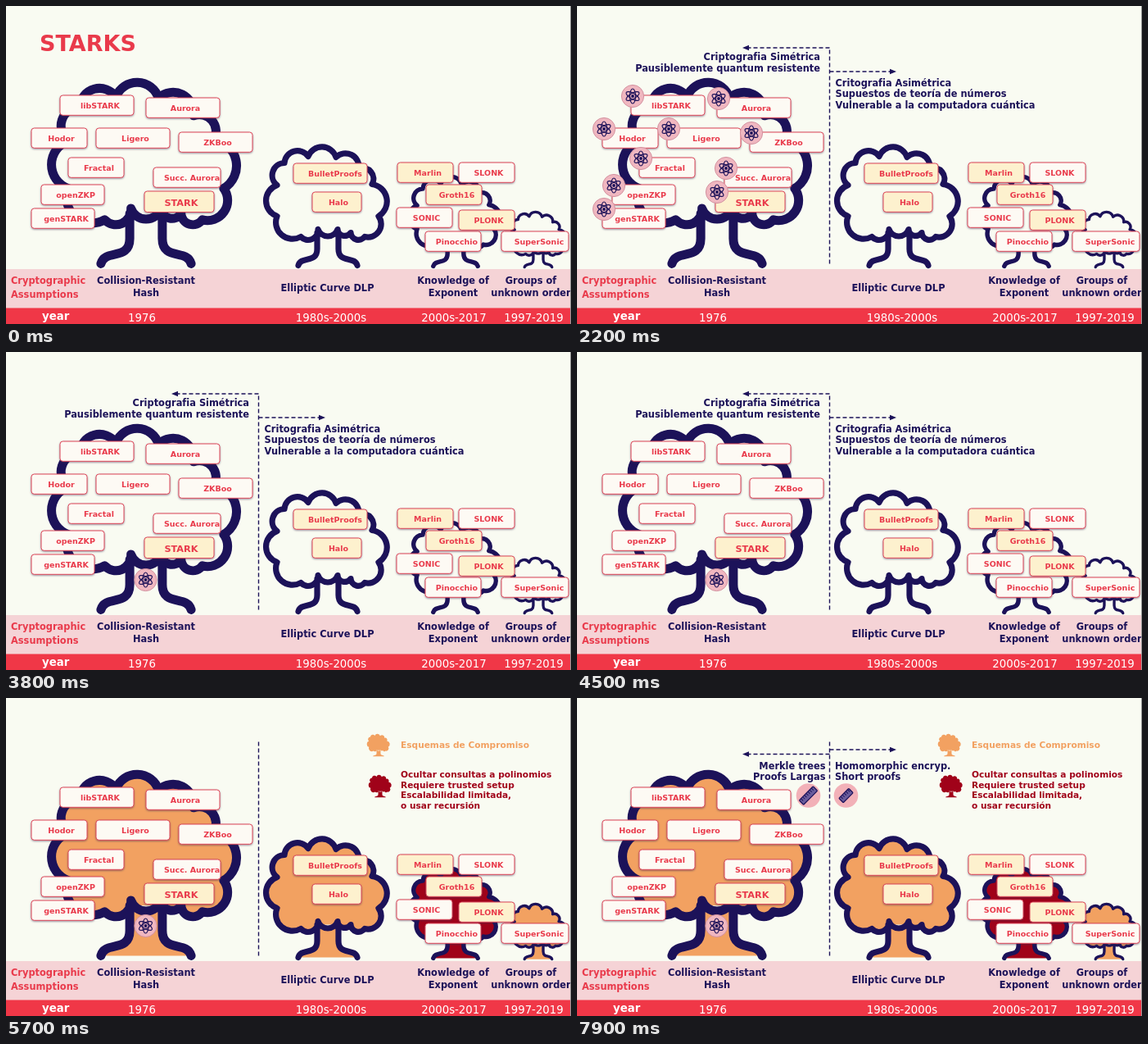
An HTML page for the animation above (8 s loop, 690x388 px).

```html
<!DOCTYPE html>
<html lang="es">
<head>
<meta charset="utf-8">
<title>STARKS</title>
<style>
  html, body { margin: 0; width: 100%; height: 100%; overflow: hidden; background: #f9fbf2; }
  svg { display: block; width: 100vw; height: 100vh; }
  text { font-family: "DejaVu Sans", Verdana, sans-serif; white-space: pre; }
  .card { filter: drop-shadow(.7px 1.5px .8px rgba(70, 45, 80, .55)); }
</style>
</head>
<body>
<svg id="stage" viewBox="0 0 690 388" xmlns="http://www.w3.org/2000/svg"></svg>
<script>
const NAVY = '#1c1259', RED = '#e93a4b', ORANGE = '#f2a161', MAROON = '#a00219';
const LOOP = 8000;
const svg = document.getElementById('stage');

const text = (x, y, s, size, fill, opt = '') =>
  `<text x="${x}" y="${y}" font-size="${size}" fill="${fill}" font-weight="bold" ${opt}>${s}</text>`;
const lines = (x, y, step, list, size, fill, opt) =>
  list.map((s, i) => text(x, y + i * step, s, size, fill, opt)).join('');
const mid = 'text-anchor="middle"', end = 'text-anchor="end"';
const group = (id, body) => `<g id="${id}">${body}</g>`;

// Scalloped outline: one outward arc between each pair of corners.
function cloud(pts) {
  return `M${pts[0]}` + pts.map((p, i) => {
    const q = pts[(i + 1) % pts.length];
    const r = 0.53 * Math.hypot(q[0] - p[0], q[1] - p[1]);
    return `A${r} ${r} 0 0 1 ${q}`;
  }).join('') + 'Z';
}

// One tree shape, standing on the origin; every tree is a scaled copy.
const crown = cloud([[-24,-137], [10,-136], [38,-122], [54,-103], [62,-64], [45,-39], [28,-44],
  [12,-48], [-12,-48], [-33,-39], [-62,-64], [-62,-102], [-53,-129]]);
const leg = s => `M${13 * s} -44V-24C${13 * s} -6 ${33 * s} -16 ${36 * s} -4`;
const trunk = leg(-1) + 'H36C33 -16 13 -6 13 -24V-44Z';

const place = (x, y, k, body) => `<g transform="translate(${x} ${y}) scale(${k})">${body}</g>`;
const solid = fill => `<path d="${crown}${trunk}" fill="${fill}"/>`;
const outline = `<path d="${crown}${leg(-1)}${leg(1)}" fill="none" stroke="${NAVY}" stroke-width="7.2"
  stroke-linecap="round" stroke-linejoin="round"/>`;

const trees = [
  { x: 171, k: 1.53, fill: ORANGE }, { x: 393, k: 1, fill: ORANGE },
  { x: 549, k: 0.756, fill: MAROON }, { x: 650, k: 0.465, fill: ORANGE }
];
const forest = body => trees.map(t => place(t.x, 320.5, t.k, body(t))).join('');

// name, left, top, width
const cards = [
  ['libSTARK', 66, 109, 90], ['Aurora', 171, 112, 90], ['Hodor', 31, 149], ['Ligero', 110, 149, 90],
  ['ZKBoo', 211, 154, 90], ['Fractal', 76, 185], ['Succ. Aurora', 180, 197, 82], ['openZKP', 43, 218, 77],
  ['STARK', 169, 226, 85], ['genSTARK', 31, 247, 77], ['BulletProofs', 351, 192, 90], ['Halo', 374, 227, 60],
  ['Marlin', 478, 191], ['SLONK', 553, 191], ['Groth16', 513, 218], ['SONIC', 477, 246],
  ['PLONK', 553, 249], ['Pinocchio', 512, 275], ['SuperSonic', 605, 275, 82]
];
const highlighted = ['STARK', 'BulletProofs', 'Halo', 'Marlin', 'Groth16', 'PLONK'];

function card([name, x, y, w = 68]) {
  const big = name === 'STARK';
  const fill = highlighted.includes(name) ? '#fdf1ce' : '#fdfaf4';
  return `<rect class="card" x="${x}" y="${y}" width="${w}" height="${big ? 25.5 : 24.3}" rx="3.5"
    fill="${fill}" stroke="#e0485a"/>` +
    text(x + w / 2 + name.length / 2, y + (big ? 17.6 : 15.8), name, big ? 11.3 : 9.5, RED, mid);
}

const atom = (x, y) => place(x, y, 1, `<circle r="13.6" fill="#f0b7c0" stroke="#d3919f"/>
  <g fill="none" stroke="${NAVY}" stroke-width="1.2">${[0, 60, 120].map(a =>
    `<ellipse rx="3.5" ry="9" transform="rotate(${a})"/>`).join('')}</g>
  <circle r="1.9" fill="${NAVY}"/>`);
const quantumSafe = cards.filter(c => c[1] < 300);

const arrow = (x, y) => {
  const s = Math.sign(x - 308.5);
  return `<path d="M308.5 ${y}H${x - 7 * s}" stroke="${NAVY}" stroke-width="1.3" stroke-dasharray="5 3"/>
    <path d="M${x} ${y}l${-8 * s} -3.2v6.4z" fill="${NAVY}"/>`;
};

function ruler(x, len) {
  let ticks = '';
  for (let i = 3 - len / 2; i < len / 2; i += 3) ticks += `M${i} -3.5v3.5`;
  return place(x, 119, 1, `<circle r="14.8" fill="#f2b1b8"/><g transform="rotate(-45)" stroke="${NAVY}">
    <rect x="${-len / 2}" y="-3.8" width="${len}" height="7.6" rx="1" fill="#6a5c9c" stroke-width="1.2"/>
    <path d="${ticks}"/></g>`);
}

const navy = (x, y, s) => text(x, y, s, 11.4, NAVY, mid);
const pair = (x, a, b) => navy(x, 338.5, a) + navy(x, 354, b);
const year = (x, s) => text(x, 385, s, 13.3, '#fff', mid + ' style="font-weight:400"');

const ground = `<rect y="321" width="690" height="48" fill="#f5d3d6"/>
  <rect y="368.5" width="690" height="19.5" fill="#f03747"/>` +
  lines(6, 339, 17, ['Cryptographic', 'Assumptions'], 11.4, RED) +
  pair(171, 'Collision-Resistant', 'Hash') + navy(392.5, 347.5, 'Elliptic Curve DLP') +
  pair(546, 'Knowledge of', 'Exponent') + pair(641, 'Groups of', 'unknown order') +
  text(44, 382.5, 'year', 13.3, '#fff') +
  year(166, '1976') + year(397, '1980s-2000s') + year(547, '2000s-2017') + year(644.5, '1997-2019');

svg.innerHTML =
  '<rect width="690" height="388" fill="#f9fbf2"/>' +
  group('title', text(41, 55.3, 'STARKS', 27, RED)) +
  group('divider', `<path d="M308.5 53.5V317" stroke="${NAVY}" stroke-width="1.4" stroke-dasharray="5 3"/>`) +
  group('fills', forest(t => solid(t.fill))) + forest(() => outline) +
  ground + cards.map(card).join('') +
  group('atoms', quantumSafe.map(([, x, y]) => atom(x + 2, y + 1)).join('')) +
  group('trunkAtom', atom(170.5, 278)) +
  group('kinds', arrow(202, 51) + arrow(390, 80) +
    lines(297, 66, 13.5, ['Criptografia Simétrica', 'Pausiblemente quantum resistente'], 11.4, NAVY, end) +
    lines(315.5, 97.7, 13.6, ['Critografia Asimétrica', 'Supuestos de teoría de números',
      'Vulnerable a la computadora cuántica'], 11.4, NAVY)) +
  group('legend', place(455, 72, 0.19, solid(ORANGE)) + place(457, 122, 0.19, solid(MAROON)) +
    text(482, 60.8, 'Esquemas de Compromiso', 10.6, ORANGE) +
    lines(482, 97, 12.7, ['Ocultar consultas a polinomios', 'Requiere trusted setup',
      'Escalabilidad limitada,', 'o usar recursión'], 10.6, MAROON)) +
  group('proofs', arrow(202, 68.5) + arrow(390, 63) +
    lines(303.5, 86.5, 13.5, ['Merkle trees', 'Proofs Largas'], 11.4, NAVY, end) +
    lines(315, 86.5, 13.5, ['Homomorphic encryp.', 'Short proofs'], 11.4, NAVY) +
    ruler(282.5, 24) + ruler(328.5, 17)) +
  '<rect x="689" width="1" height="388" fill="#999"/>';

// Visible span of each group, in ms.
const spans = {
  title: [0, 1900], divider: [1900, LOOP], atoms: [1900, 3800], kinds: [1900, 5600],
  trunkAtom: [3800, LOOP], fills: [5600, LOOP], legend: [5600, LOOP], proofs: [7800, LOOP]
};
const parts = Object.entries(spans).map(([id, span]) => [document.getElementById(id), span]);

function draw(t) {
  for (const [el, [from, to]] of parts) el.style.display = t >= from && t < to ? '' : 'none';
}

const start = performance.now();
function tick() {
  draw((performance.now() - start) % LOOP);
  requestAnimationFrame(tick);
}
tick();
</script>
</body>
</html>
```
